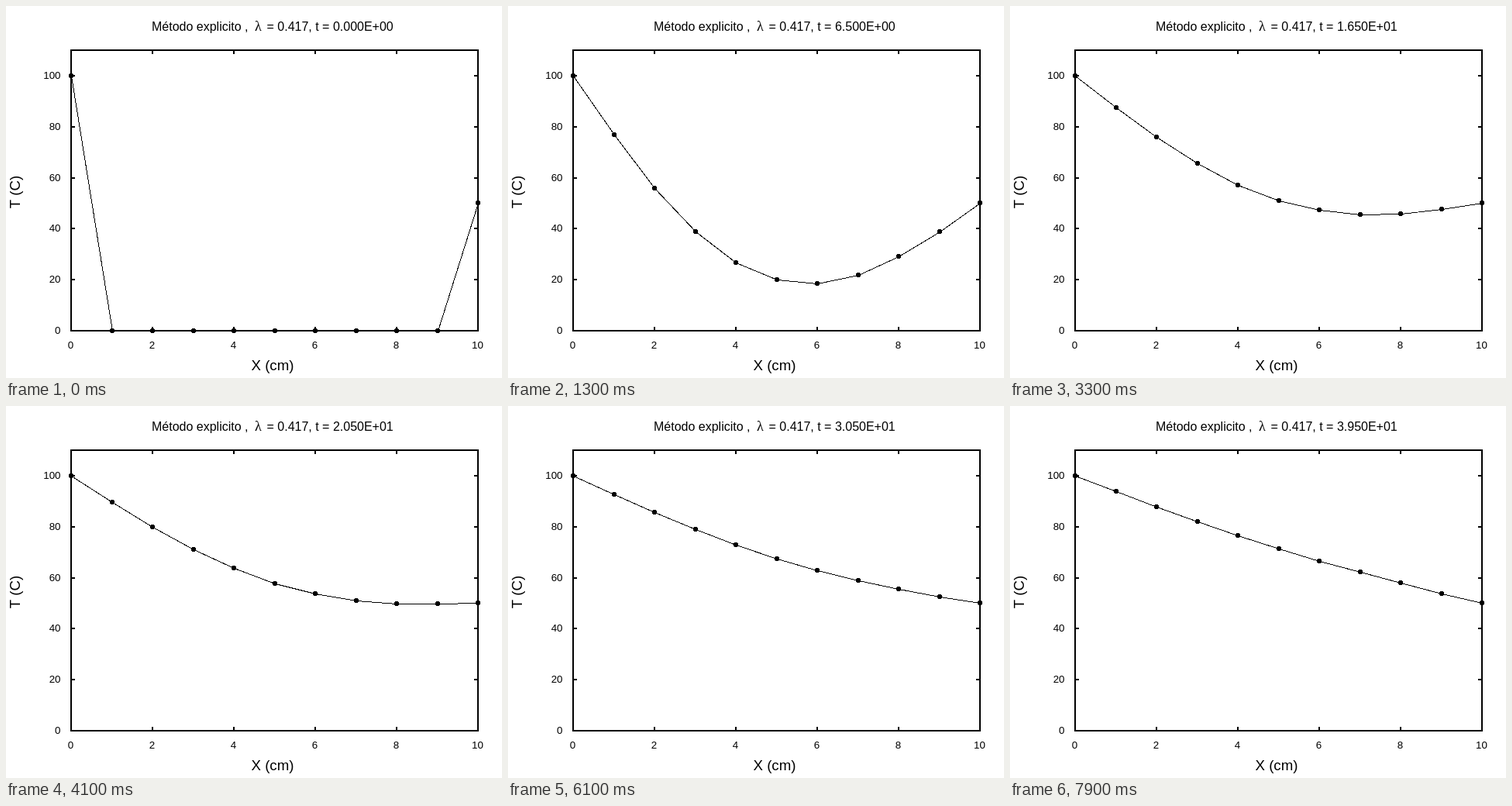
An HTML page for the animation above (8000 ms loop, 640 by 480 pixels).

```html
<!DOCTYPE html>
<html lang="es">
<head>
<meta charset="utf-8">
<title>Método explicito</title>
<style>
  html, body { margin: 0; width: 100%; height: 100%; overflow: hidden; background: #fff; }
  svg { display: block; }
  text { font-family: "Liberation Sans", Arial, sans-serif; font-size: 13.333px; font-kerning: none; white-space: pre; }
  .title { font-size: 16px; }
  .label { font-size: 18.667px; text-anchor: middle; }
  .symbol { font-family: "Liberation Serif", Times, serif; font-size: 18px; }
  .frame { fill: none; stroke: #000; stroke-width: 2; shape-rendering: crispEdges; }
  .curve { fill: none; stroke: #000; stroke-width: 1; shape-rendering: crispEdges; }
</style>
</head>
<body>
<svg id="plot" width="640" height="480" viewBox="0 0 640 480">
  <rect width="640" height="480" fill="#fff"/>
  <text class="title" x="188" y="32">Método explicito ,</text>
  <text class="title symbol" x="321" y="32">λ</text>
  <text class="title" id="clock" x="336.5" y="32"></text>
  <text class="label" x="344" y="470">X (cm)</text>
  <text class="label" transform="translate(17.5 240) rotate(-90)">T (C)</text>
</svg>
<script>
const STEP_MS = 100, STEPS = 80, DT = 0.5, LAMBDA = 0.4175;
const LEFT = 84, RIGHT = 609, TOP = 57, BOTTOM = 419, TICK = 5;
const plot = document.getElementById('plot');
const clock = document.getElementById('clock');

const px = x => LEFT + x * (RIGHT - LEFT) / 10;
const py = t => BOTTOM - t * (BOTTOM - TOP) / 110;

function add(tag, attrs, text = '') {
  const el = document.createElementNS('http://www.w3.org/2000/svg', tag);
  for (const key in attrs) el.setAttribute(key, attrs[key]);
  el.textContent = text;
  return plot.appendChild(el);
}

// Axes with inward ticks on all four sides
let axes = `M${LEFT} ${TOP}H${RIGHT}V${BOTTOM}H${LEFT}Z`;
for (let x = 0; x <= 10; x += 2) {
  const at = Math.round(px(x));
  axes += `M${at} ${BOTTOM}v${-TICK}M${at} ${TOP}v${TICK}`;
  add('text', { x: px(x) - 0.5, y: 442, 'text-anchor': 'middle' }, x);
}
for (let t = 0; t <= 100; t += 20) {
  const at = Math.round(py(t));
  axes += `M${LEFT} ${at}h${TICK}M${RIGHT} ${at}h${-TICK}`;
  add('text', { x: 70.5, y: at + 4, 'text-anchor': 'end' }, t);
}
add('path', { class: 'frame', d: axes });

// Explicit finite differences for the heat equation, fixed end temperatures
const states = [[100, ...Array(9).fill(0), 50]];
while (states.length < STEPS) {
  const u = states[states.length - 1];
  states.push(u.map((v, i) =>
    i % 10 ? v + LAMBDA * (u[i - 1] - 2 * v + u[i + 1]) : v));
}

const curve = add('polyline', { class: 'curve' });
const dots = states[0].map(() => add('path', { d: 'M-2-3H2V-2H3V2H2V3H-2V2H-3V-2H-2Z' }));

function scientific(value) {
  const [mantissa, power] = value.toExponential(3).split('e');
  return `${mantissa}E${power[0]}${power.slice(1).padStart(2, '0')}`;
}

let shown = -1;
function draw(ms) {
  const step = Math.floor(ms / STEP_MS) % STEPS;
  if (step !== shown) {
    shown = step;
    const points = states[step].map((t, i) => [Math.round(px(i)), Math.round(py(t))]);
    curve.setAttribute('points', points.map(([x, y]) => `${x + 0.5},${y + 0.5}`).join(' '));
    dots.forEach((dot, i) => dot.setAttribute('transform', `translate(${points[i]})`));
    clock.textContent = `= 0.417, t = ${scientific(step * DT)}`;
  }
}

const start = performance.now();
function tick() {
  draw(performance.now() - start);
  requestAnimationFrame(tick);
}
tick();
</script>
</body>
</html>
```
